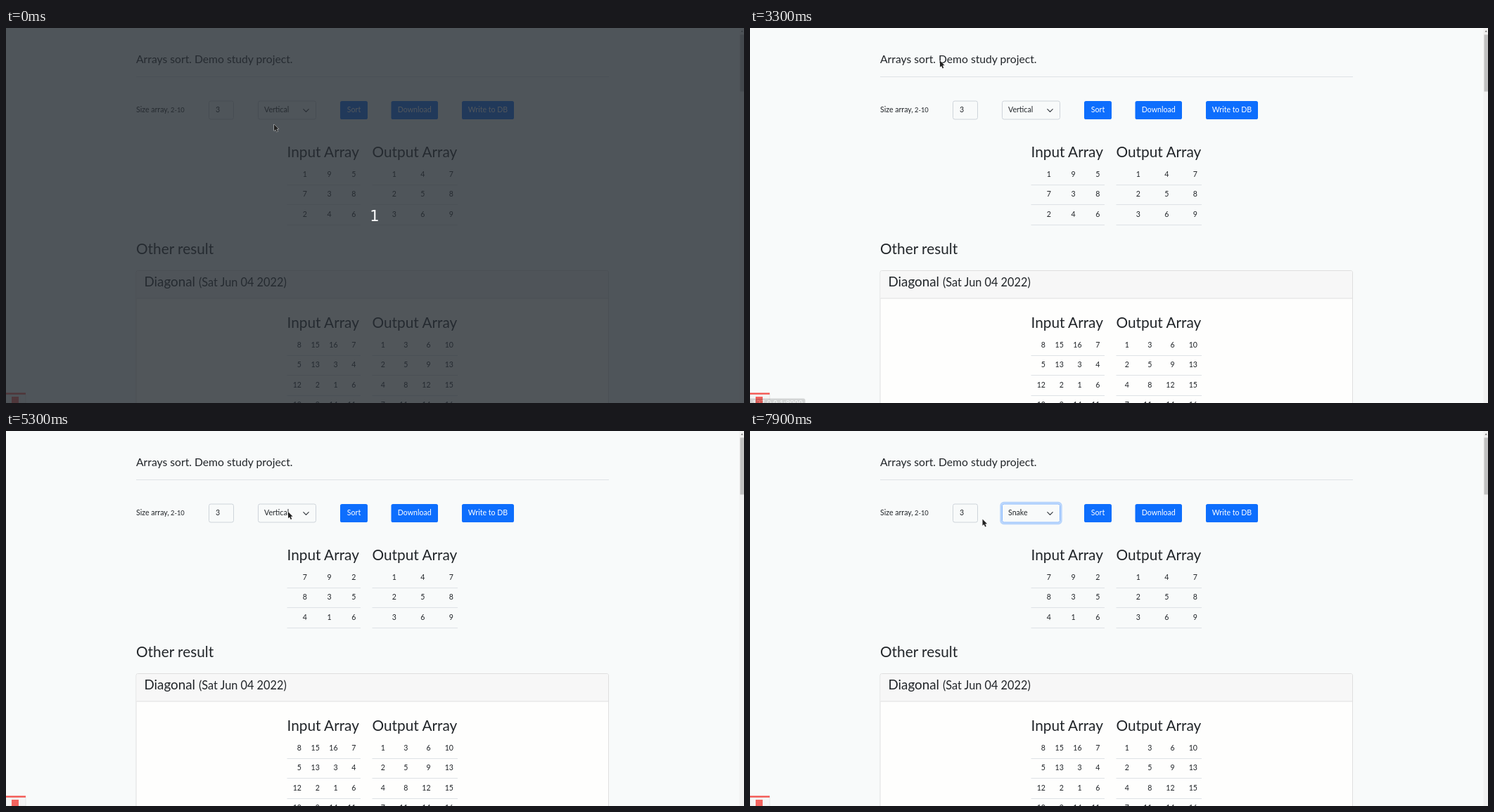
Write an HTML page that moves like this. It is 1049 by 534 pixels and loops after 8000 ms.

```html
<!DOCTYPE html>
<html lang="en">
<head>
<meta charset="utf-8">
<title>Arrays sort</title>
<style>
  html, body { margin: 0; width: 100%; height: 100%; overflow: hidden; background: #f8fafa; }
  svg { display: block; font: 10.6px Lato, "Open Sans", sans-serif; fill: #212529; }
  .h2 { font-size: 20.8px; }
  .end { text-anchor: end; }
  .mid { text-anchor: middle; }
  .field { fill: #f8fafa; stroke: #ced4da; }
  .focus { stroke: #86b7fe; }
  .button rect { fill: #0d6efd; }
  .button text, .picked { fill: #fff; }
  .rule { fill: #dee2e6; }
  .pointer { stroke: #fff; stroke-width: .8; stroke-linejoin: round; fill: #222; paint-order: stroke; }
  #popup { filter: drop-shadow(0 1px 2px rgba(0, 0, 0, .3)); }
</style>
</head>
<body>
<svg width="1049" height="534" viewBox="0 0 1049 534">
  <rect width="1049" height="534" fill="#f8fafa"/>
  <g id="page">
    <text x="185" y="50.3" font-size="15.7">Arrays sort. Demo study project.</text>
    <rect class="rule" x="185" y="69" width="672" height="1"/>
    <text x="185" y="120">Size array,</text>
    <text x="234" y="120" font-size="9.4">2-10</text>
    <rect class="field" x="288.5" y="104" width="35" height="26" rx="2.6"/>
    <text x="298" y="120">3</text>
    <rect id="ring" x="356.7" y="102.2" width="85.6" height="29.6" rx="4" fill="none" stroke="#0d6efd" stroke-opacity=".27" stroke-width="2.8"/>
    <rect id="select" class="field" x="358.5" y="104" width="82" height="26" rx="2.6"/>
    <text id="choice" x="367" y="120">Vertical</text>
    <path d="M422.8 115.6l3.7 3.7 3.7-3.7" fill="none" stroke="#343a40" stroke-width="1.2" stroke-linecap="round" stroke-linejoin="round"/>
    <g id="buttons"></g>
    <g id="results">
      <g id="first"></g>
      <text class="h2" x="185" y="322">Other result</text>
      <rect x="185" y="345.5" width="671.5" height="220" rx="2.6" fill="#fefefd" stroke="#dfdfdf"/>
      <path d="M185.5 385v-37q0-2 2-2h666.500q2 0 2 2v37z" fill="#f7f7f7"/>
      <rect x="185.5" y="384.5" width="670.5" height="1" fill="#dfdfdf"/>
      <text x="196.5" y="368" font-size="18.8">Diagonal</text>
      <text x="274" y="368" font-size="16.3">(Sat Jun 04 2022)</text>
      <g id="second"></g>
    </g>
    <g id="popup">
      <rect x="358.8" y="130.3" width="82" height="72" fill="#f8fafa" stroke="#777" stroke-width=".8"/>
      <rect id="bar" x="359.2" width="81.2" height="14.2" fill="#e95420"/>
      <g id="options"></g>
    </g>
  </g>
  <g id="scroll">
    <rect x="1042.5" width="7" height="534" fill="#f1f1f1"/>
    <rect x="1043.5" y="9.5" width="5.5" height="81" fill="#c1c1c1"/>
    <path d="M1044.6 5.5l1.6-2 1.6 2z" fill="#606060"/>
  </g>
  <rect y="522" width="28" height="12" fill="#f5f5f5" stroke="#ddd" stroke-width=".6"/>
  <rect y="519.5" width="28" height="2.3" fill="#f4544f"/>
  <rect x="8" y="525" width="10" height="10" fill="#f4645f"/>
  <g id="status">
    <path d="M0 527.5h76q2.500 0 2.500 2.500v4H0z" fill="#2b2b2b"/>
    <text x="3" y="538" style="font-family:'Noto Sans',sans-serif" fill="#eee">127.0.0.1:8000</text>
  </g>
  <g id="countdown">
    <rect width="1049" height="534" fill="rgb(38,44,51)" opacity=".8"/>
    <text class="mid" x="524" y="275" style="font:21px 'DejaVu Sans',sans-serif" fill="#fff">1</text>
  </g>
  <path id="arrow" class="pointer" d="M0 0v9.300l2.100-1.900 1.600 3.500 1.600-.7-1.600-3.400h2.900z"/>
  <path id="hand" class="pointer" d="M-.8.6q1-1 2 0v3.900l4.400.8q1 .4 1 1.600l-.7 3.900h-5.700l-3.400-3.600q-.5-1.200.8-1.200l1.600.8z"/>
</svg>
<script>
const $ = id => document.getElementById(id);
const LOOP = 8000, STEP = 100;
const OPTIONS = ['Vertical', 'Horizontal', 'Diagonal', 'Snake', 'Snail'];
const MENU_TOP = 130.4, MENU_ROW = 14.25;

// pointer moves: first step, last step, destination
const MOVES = [
  { from: 0, to: 0, x: 381, y: 137 },
  { from: 200, to: 200, x: 407.5, y: 143.5 },
  { from: 1000, to: 1200, x: 344, y: 97 },
  { from: 1400, to: 1800, x: 270, y: 46.5 },
  { from: 4400, to: 4400, x: 350.5, y: 97 },
  { from: 5000, to: 5300, x: 401, y: 115 },
  { from: 6000, to: 7000, x: 396, y: 177 },
  { from: 7600, to: 7900, x: 330.5, y: 125.5 }
];

const ramp = (t, a, b) => Math.min(1, Math.max(0, (t - a) / (b - a)));
const ease = p => p * p * (3 - 2 * p);
const within = (t, a, b) => t >= a && t < b;
const show = (id, on) => { $(id).style.display = on ? '' : 'none'; };

const label = (x, y, str, cls = '') => `<text x="${x}" y="${y}" class="${cls}">${str}</text>`;

const button = (x, w, str) =>
  `<g class="button"><rect x="${x}" y="104" width="${w}" height="26" rx="2.6"/>${label(x + w / 2, 120, str, 'mid')}</g>`;

// fills an n by n grid with 1, 2, 3... in the order given by the key
function sorted(n, key) {
  const cells = Array.from({ length: n * n }, (_, i) => ({ r: Math.floor(i / n), c: i % n }));
  const grid = Array.from({ length: n }, () => []);
  cells.sort((a, b) => key(a) - key(b) || a.r * (a.c - b.c) || a.c - b.c || a.r - b.r)
    .forEach(({ r, c }, i) => { grid[r][c] = i + 1; });
  return grid;
}

const vertical = n => sorted(n, p => p.c * n + p.r);
const diagonal = n => sorted(n, p => (p.r + p.c) * n + p.c);
const parse = str => str.split('/').map(row => row.split(' '));

// numbers are right aligned between the first and last column edge
function table(title, x, y, w, first, last, grid) {
  const rows = grid.map((row, r) => {
    const base = y + 27.6 + r * 28.5;
    const cells = row.map((n, c) => label(first + (last - first) * c / (row.length - 1), base, n, 'end'));
    return cells.join('') + `<rect class="rule" x="${x}" y="${Math.round(base + 11)}" width="${w}" height="1"/>`;
  });
  return label(x, y, title, 'h2') + rows.join('');
}

const pair = (y, inFirst, outFirst, input, output) =>
  table('Input Array', 399.5, y, 104.5, inFirst, 497.5, parse(input)) +
  table('Output Array', 520.5, y, 121.5, outFirst, 636, output);

const firstPair = input => pair(184, 428, 555, input, vertical(3));
const BEFORE = firstPair('1 9 5/7 3 8/2 4 6');
const AFTER = firstPair('7 9 2/8 3 5/4 1 6');

$('buttons').innerHTML = button(475, 39, 'Sort') + button(547.5, 66.5, 'Download') + button(648, 74, 'Write to DB');
$('second').innerHTML = pair(427, 420, 539, '8 15 16 7/5 13 3 4/12 2 1 6/10 9 14 11', diagonal(4));
$('options').innerHTML = OPTIONS.map((o, i) => label(367.5, 140.6 + i * MENU_ROW, o)).join('');

function pointerAt(t) {
  const i = MOVES.findLastIndex(m => m.from <= t);
  const move = MOVES[i], prev = MOVES[i - 1] || move;
  const p = ease(ramp(t, move.from - STEP, move.to));
  return { x: prev.x + (move.x - prev.x) * p, y: prev.y + (move.y - prev.y) * p };
}

let reloaded = null;

function draw(time) {
  const t = Math.floor(time / STEP) * STEP;
  const { x, y } = pointerAt(t);
  const hand = y < 54 && !within(t, 2700, 3700);
  const loading = within(t, 3500, 4000);

  show('countdown', t < 200);
  show('arrow', !hand);
  show('hand', hand);
  $(hand ? 'hand' : 'arrow').setAttribute('transform', `translate(${x} ${y})`);
  $('status').setAttribute('opacity', ramp(t, 1600, 1800) * (1 - ramp(t, 3060, 3350)));

  // without the scrollbar the centred page sits 3px further right
  show('results', !loading);
  show('scroll', !loading);
  $('page').setAttribute('transform', `translate(${loading ? 3 : 0} 0)`);
  if (reloaded !== t >= 4000) {
    reloaded = t >= 4000;
    $('first').innerHTML = reloaded ? AFTER : BEFORE;
  }

  $('ring').setAttribute('opacity', ramp(t, 5500, 5700));
  $('select').classList.toggle('focus', t >= 5600);
  $('choice').textContent = t < 7600 ? 'Vertical' : 'Snake';

  show('popup', within(t, 5700, 7400));
  const picked = Math.floor(ramp(y, MENU_TOP, MENU_TOP + MENU_ROW * 5) * 4.999);
  $('bar').setAttribute('y', MENU_TOP + picked * MENU_ROW);
  [...$('options').children].forEach((o, i) => o.classList.toggle('picked', i === picked));
}

const start = performance.now();
function tick() {
  draw((performance.now() - start) % LOOP);
  requestAnimationFrame(tick);
}
tick();
</script>
</body>
</html>
```
